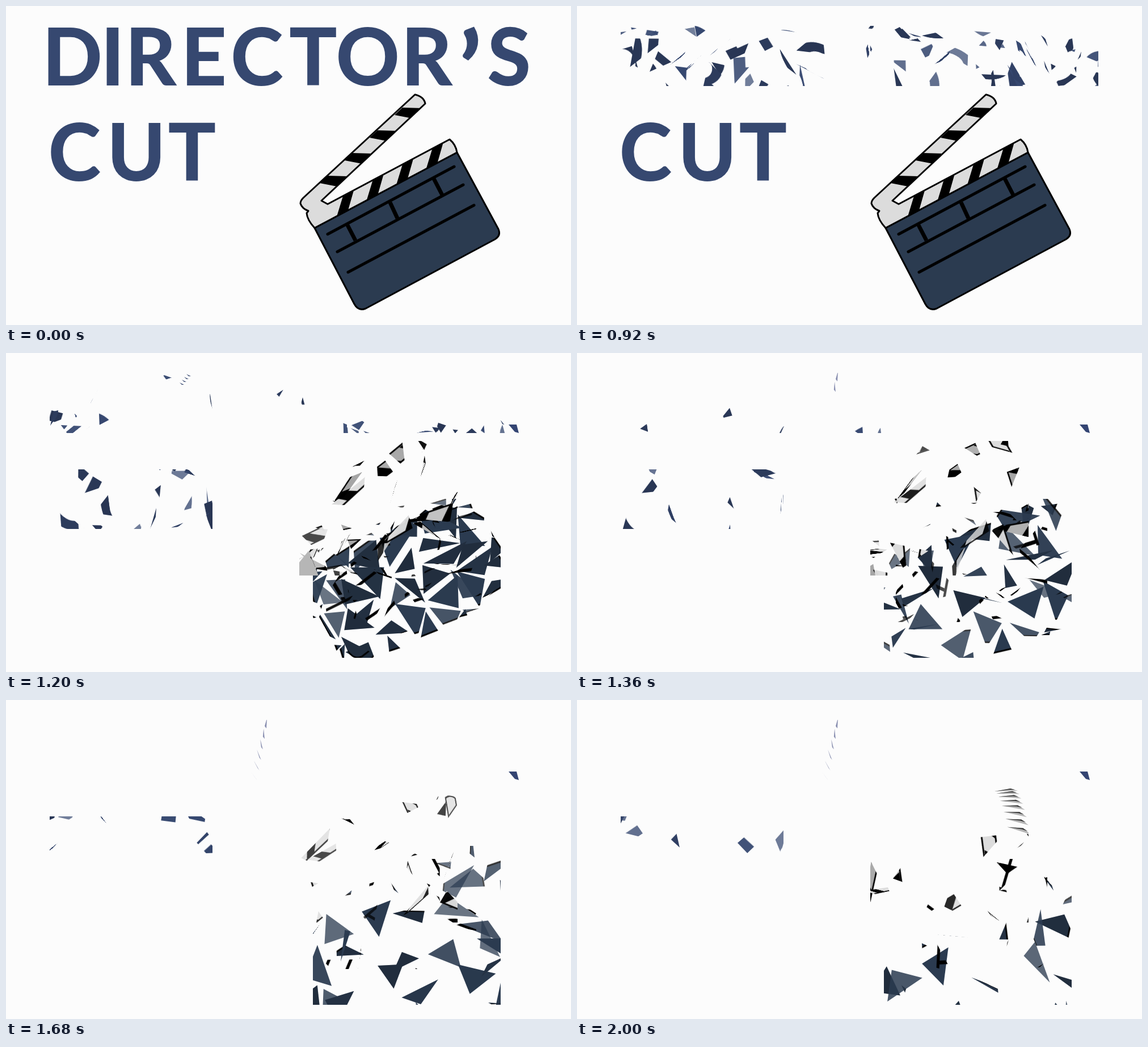
Animation, 996 px wide and 562 px high, one loop 2.04 s. Source, as an HTML page with a canvas:

```html
<!DOCTYPE html>
<html lang="en">
<head>
<meta charset="utf-8">
<title>Director’s Cut</title>
<style>
html, body { margin: 0; width: 100%; height: 100%; overflow: hidden; background: #fcfcfc; }
canvas { display: block; width: 100vw; height: 100vh; }
</style>
</head>
<body>
<canvas id="stage" width="996" height="562"></canvas>
<script>
const W = 996, H = 562, LOOP = 2040, STEP = 40, CELL = 52;
const BLUE = '#364870', NAVY = '#2b3b50', GREY = '#dcdcdc';
const ctx = document.getElementById('stage').getContext('2d');

let seed = 11;
const rnd = () => {
  seed = (seed * 1664525 + 1013904223) >>> 0;
  return seed / 4294967296;
};
const spread = r => (rnd() * 2 - 1) * r;

// ---- artwork ----

// Each letter is centred on its own x.
function letters(c, word, centers, base) {
  c.fillStyle = c.strokeStyle = BLUE;
  c.lineWidth = 2;
  c.lineJoin = 'miter';
  [...word].forEach((ch, i) => {
    const quote = ch === '’';
    c.font = `bold ${quote ? 180 : 138}px Lato, sans-serif`;
    const m = c.measureText(ch);
    const x = centers[i] + (m.actualBoundingBoxLeft - m.actualBoundingBoxRight) / 2;
    const y = quote ? 37 + m.actualBoundingBoxAscent : base;
    c.fillText(ch, x, y);
    c.strokeText(ch, x, y);
  });
}

function drawSticks(c) {
  const body = new Path2D('M721 156Q737 160 739 172L556 343L567 349L782 235Q793 244 795 258' +
    'L544 391Q531 377 530 365L533 361Q522 357 519 348Q519 343 524 338Z');
  c.fillStyle = GREY;
  c.fill(body);
  c.save();
  c.clip(body);
  c.fillStyle = '#000';
  for (let k = 0; k < 4; k++) {
    const x = 44 * k, y = -40 * k, u = 52.6 * k, v = -28.2 * k;
    c.fill(new Path2D(`M${553 + x} ${312 + y}l14 -13l36 1l-19 18Z` +
      `M${583 + u} ${371 + v}l11 -36l19 -10l-10 35Z`));
  }
  c.restore();
  c.lineWidth = 3;
  c.lineJoin = 'round';
  c.strokeStyle = '#000';
  c.stroke(body);
}

function drawBoard(c) {
  const body = new Path2D('M544 391L795 258L868 393Q873 404 862 411L634 533Q621 538 614 525Z');
  c.fillStyle = NAVY;
  c.fill(body);
  c.lineWidth = 3;
  c.lineJoin = 'round';
  c.strokeStyle = '#000';
  c.stroke(body);
}

function drawLines(c) {
  c.strokeStyle = '#000';
  c.lineCap = 'round';
  c.lineWidth = 5;
  c.stroke(new Path2D('M567 402L790 283M584 433L806 315M603 469L825 351'));
  c.lineCap = 'butt';
  c.lineWidth = 7;
  c.stroke(new Path2D('M602 386L616 413M677 346L690 374M754 304L769 333'));
}

// ---- shattering ----

function sheet(draw, dark) {
  const el = document.createElement('canvas');
  el.width = W;
  el.height = H;
  const c = el.getContext('2d');
  draw(c);
  if (dark) {
    c.globalCompositeOperation = 'source-in';
    c.fillStyle = '#000';
    c.fillRect(0, 0, W, H);
  }
  return el;
}

function shard(points, mx, my) {
  const cx = (points[0][0] + points[1][0] + points[2][0]) / 3;
  const cy = (points[0][1] + points[1][1] + points[2][1]) / 3;
  const reach = Math.hypot(cx - mx, cy - my) + 30;
  const push = 8 + rnd() * 4;
  return {
    cx, cy,
    path: new Path2D('M' + points.map(p => p.join(' ')).join('L') + 'Z'),
    px: push * (cx - mx) / reach,
    py: push * (cy - my) / reach * .7,
    vx: spread(1.6),
    vy: spread(4) - .5,
    weight: .6 + rnd() * .8,
    axis: rnd() * Math.PI,
    tumble: spread(.4),
    spin: spread(.1)
  };
}

function group(x, y, w, h, start, fall, draw) {
  const cols = Math.ceil((w + 26) / CELL), rows = Math.ceil((h + 27) / CELL);
  const grid = [];
  for (let r = 0; r <= rows; r++) {
    grid.push([]);
    for (let q = 0; q <= cols; q++)
      grid[r].push([x - 26 + q * CELL + spread(14), y - 27 + r * CELL + spread(4)]);
  }
  const shards = [];
  for (let r = 0; r < rows; r++) {
    for (let q = 0; q < cols; q++) {
      const a = grid[r][q], b = grid[r][q + 1], d = grid[r + 1][q], e = grid[r + 1][q + 1];
      const halves = rnd() < .5 ? [[a, b, e], [a, e, d]] : [[a, b, d], [b, e, d]];
      for (const half of halves) shards.push(shard(half, x + w / 2, y + h / 2));
    }
  }
  const whole = sheet(draw);
  return {
    x, y, w, h, start, fall, shards, whole,
    fill: ctx.createPattern(whole, 'no-repeat'),
    shade: ctx.createPattern(sheet(draw, true), 'no-repeat')
  };
}

const groups = [
  group(77, 35, 842, 106, 680, 1.35, c =>
    letters(c, 'DIRECTOR’S', [120, 188, 261, 352, 444, 541.5, 638, 747.5, 819, 886], 139)),
  group(77, 205, 287, 105, 960, .45, c => letters(c, 'CUT', [122.5, 229.5, 328], 307)),
  group(541, 257, 331, 280, 1120, .7, drawBoard),
  group(562, 280, 267, 194, 1080, .6, drawLines),
  group(517, 155, 279, 237, 1040, .6, drawSticks)
];

function drawShard(g, s, n) {
  const drift = n ** .85, turn = s.tumble * n, light = Math.sin(2 * turn);
  ctx.save();
  ctx.translate(s.cx + s.px * drift + s.vx * n,
    s.cy + s.py * drift + s.vy * n + g.fall * s.weight * n * n / 2);
  ctx.rotate(s.spin * n + s.axis);
  ctx.scale(1, Math.cos(turn));
  ctx.rotate(-s.axis);
  ctx.translate(-s.cx, -s.cy);
  ctx.globalAlpha = 1 - .3 * Math.max(0, light) ** 4;
  ctx.fillStyle = g.fill;
  ctx.fill(s.path);
  if (light < 0) {
    ctx.globalAlpha = -.25 * light;
    ctx.fillStyle = g.shade;
    ctx.fill(s.path);
  }
  ctx.restore();
}

function drawGroup(g, t) {
  if (t < g.start) return ctx.drawImage(g.whole, 0, 0);
  const n = (t - g.start) / STEP + 1;
  clipped(g, () => g.shards.forEach(s => drawShard(g, s, n)));
}

function clipped({ x, y, w, h }, paint) {
  ctx.save();
  ctx.beginPath();
  ctx.rect(x, y, w, h);
  ctx.clip();
  paint();
  ctx.restore();
}

// ---- slivers that leave a trail ----

function poly(color, ...points) {
  ctx.fillStyle = color;
  ctx.fill(new Path2D('M' + points.join(' ') + 'Z'));
}

function trail(start, count, t, paint) {
  for (let i = 0; i < count && t >= start + i * STEP; i++) paint(i);
}

function drawTrails(t) {
  clipped(groups[0], () => {
    if (t >= 1200) poly('#344573', 886, 126, 900, 126, 904, 141, 897, 139);
    if (t < 1280) trail(1040, 4, t, i => {
      const x = 318 - 4 * i, y = 37 + 5 * i;
      poly('#435378', x, y, x + 8, y + 4, x + 4, y + 4);
    });
    trail(1320, 6, t, i => {
      const x = 459 - 4.5 * i, y = 41 + 18.5 * i, dx = 1.4 * i - 1;
      poly('#868cae', x - dx, y - 9, x + dx + 1, y + 9, x + dx - 2, y + 5);
    });
  });
  clipped(groups[4], () => trail(1720, 8, t, i => {
    const x = 756 + 3.2 * i, y = 157 + 4 * i + .85 * i * i;
    poly('#b4b4b4', x - 20, y + 4 - i, x + 8, y - 1, x + 21, y + 3 + i);
    poly('#333', x - 20, y + 4 - i, x + 8, y - 1, x + 16, y + 1 + i / 2, x + 6, y + 1);
  }));
}

function frame(now) {
  const t = Math.floor(now % LOOP / STEP) * STEP;
  ctx.fillStyle = '#fcfcfc';
  ctx.fillRect(0, 0, W, H);
  groups.forEach(g => drawGroup(g, t));
  drawTrails(t);
  requestAnimationFrame(frame);
}
requestAnimationFrame(frame);
</script>
</body>
</html>
```
